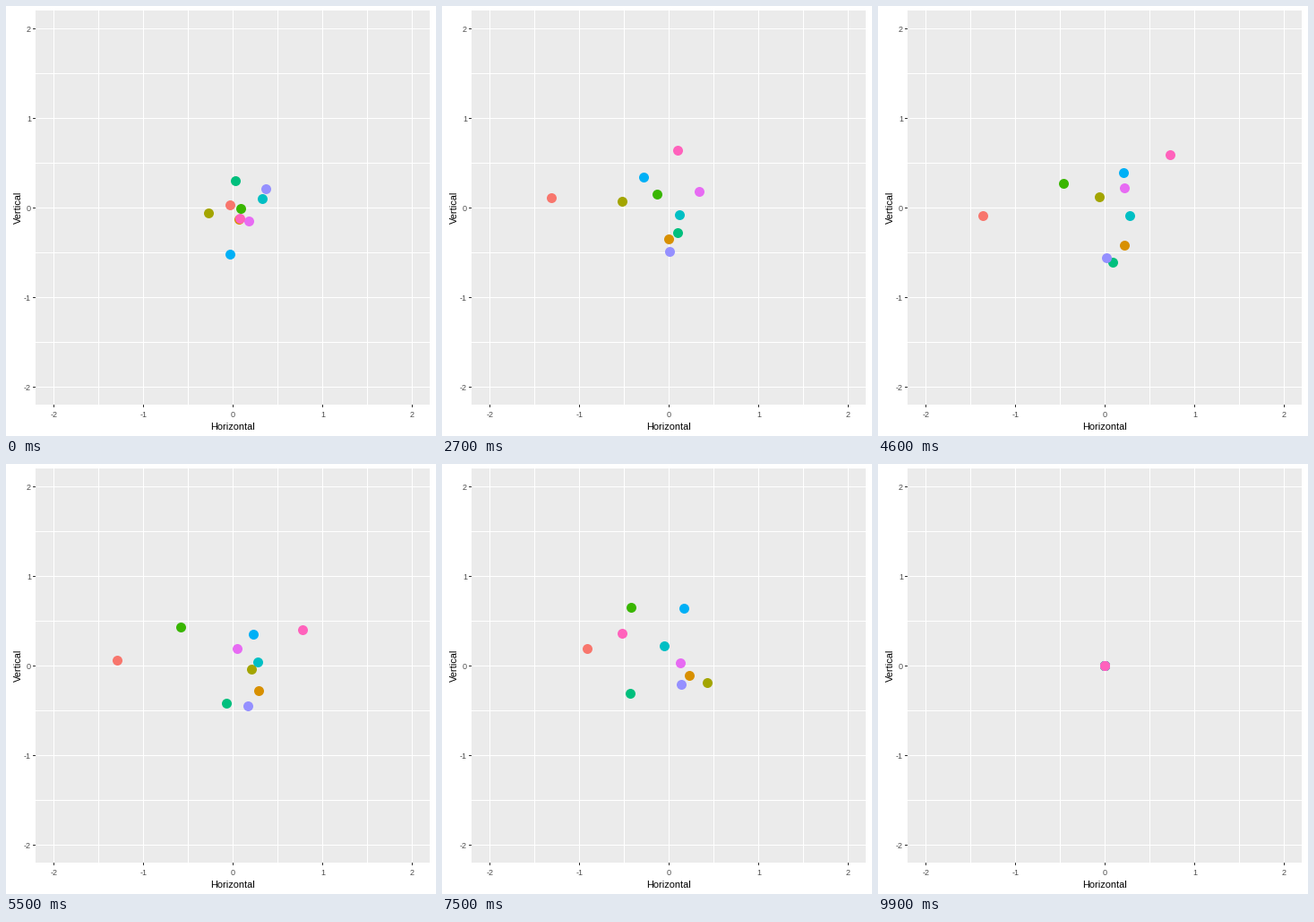
Animation, 480 px wide and 480 px high, one loop 10 s. Source, as a matplotlib script:

```python
import numpy as np
import matplotlib.pyplot as plt
from matplotlib.animation import FuncAnimation
from matplotlib.patches import Rectangle

SIZE, DPI, FRAMES, STEPS = 480, 100, 100, 20
CX, CY, UNIT = 253, 225, 100          # pixel of the origin, pixels per unit
ROUGHNESS = 4                         # random wander, pixels per root frame

plt.rcParams["font.family"] = "Liberation Sans"

# Each dot visits a few points (x + yj, in pixels from the origin) and ends at 0
TIMES = [0, 16, 37, 55, 75, FRAMES - 1]
DOTS = {
    "#F8766D": [-3 + 3j, -104 + 19j, -146 + 7j, -129 + 6j, -91 + 19j, 0],
    "#D89000": [7 - 13j, -16 + 13j, 1 - 54j, 29 - 28j, 23 - 11j, 0],
    "#A3A500": [-27 - 6j, -34 - 3j, -38 + 22j, 21 - 4j, 43 - 19j, 0],
    "#39B600": [9 - 1j, -24 + 13j, -17 + 28j, -58 + 43j, -42 + 65j, 0],
    "#00BF7D": [3 + 30j, -26 + 29j, 41 - 57j, -7 - 42j, -43 - 31j, 0],
    "#00BFC4": [33 + 10j, -12 - 6j, 32 - 6j, 28 + 4j, -5 + 22j, 0],
    "#00B0F6": [-3 - 52j, -46 + 42j, 26 + 65j, 23 + 35j, 17 + 64j, 0],
    "#9590FF": [37 + 21j, 22 - 48j, -12 - 44j, 17 - 45j, 14 - 21j, 0],
    "#E76BF3": [18 - 15j, 19 + 10j, 30 + 39j, 5 + 19j, 13 + 3j, 0],
    "#FF62BC": [8 - 12j, -48 + 57j, 64 + 65j, 78 + 40j, -52 + 36j, 0],
}


def walk(points, rng):
    """Straight steps of a random walk that is pinned to the given points."""
    knots = np.union1d(np.rint(np.linspace(0, FRAMES - 1, STEPS)), TIMES)
    nxt = np.clip(np.searchsorted(TIMES, knots), 1, len(TIMES) - 1)
    a, b = np.take(TIMES, nxt - 1), np.take(TIMES, nxt)
    spread = ROUGHNESS * np.sqrt((knots - a) * (b - knots) / (b - a))
    noise = rng.standard_normal((2, len(knots)))
    z = np.interp(knots, TIMES, points) + spread * (noise[0] + 1j * noise[1])
    return np.interp(np.arange(FRAMES), knots, z)


rng = np.random.default_rng(20)
paths = np.array([walk(points, rng) for points in DOTS.values()])
xs = np.rint(CX + paths.real) + 0.5
ys = np.rint(CY - paths.imag) + 0.5

fig = plt.figure(figsize=(SIZE / DPI, SIZE / DPI), dpi=DPI, facecolor="white")
ax = fig.add_axes([0, 0, 1, 1])
ax.set_xlim(0, SIZE)
ax.set_ylim(SIZE, 0)
ax.axis("off")


def box(x, y, w, h, color):
    ax.add_patch(Rectangle((x, y), w, h, fc=color, lw=0, antialiased=False))


def label(x, y, text, px, color, ha="center", rotation=0):
    ax.text(x, y, text, fontsize=px * 72 / DPI, color=color, ha=ha,
            va="baseline", rotation=rotation, rotation_mode="anchor")


box(33, 5, 440, 440, "#EBEBEB")
for half in range(-4, 5):
    d = half * UNIT // 2
    box(CX + d, 5, 1, 440, "white")
    box(33, CY + d, 440, 1, "white")
for n in range(-2, 3):
    x, y = CX + n * UNIT, CY - n * UNIT
    box(x, 445, 1, 3, "#333333")
    box(30, y, 3, 1, "#333333")
    label(x + 0.5, 459, str(n), 9, "#4D4D4D")
    label(28, y + 4.3, str(n), 9, "#4D4D4D", ha="right")
label(253, 473, "Horizontal", 11, "black")
label(16.5, 225, "Vertical", 11, "black", rotation=90)

dots = ax.scatter(xs[:, 0], ys[:, 0], s=(11 * 72 / DPI) ** 2, c=list(DOTS),
                  linewidths=0, zorder=5)


def draw(frame):
    dots.set_offsets(np.column_stack([xs[:, frame], ys[:, frame]]))
    return [dots]


anim = FuncAnimation(fig, draw, frames=FRAMES, interval=100,
                     repeat=True, repeat_delay=0)
plt.show()
```
